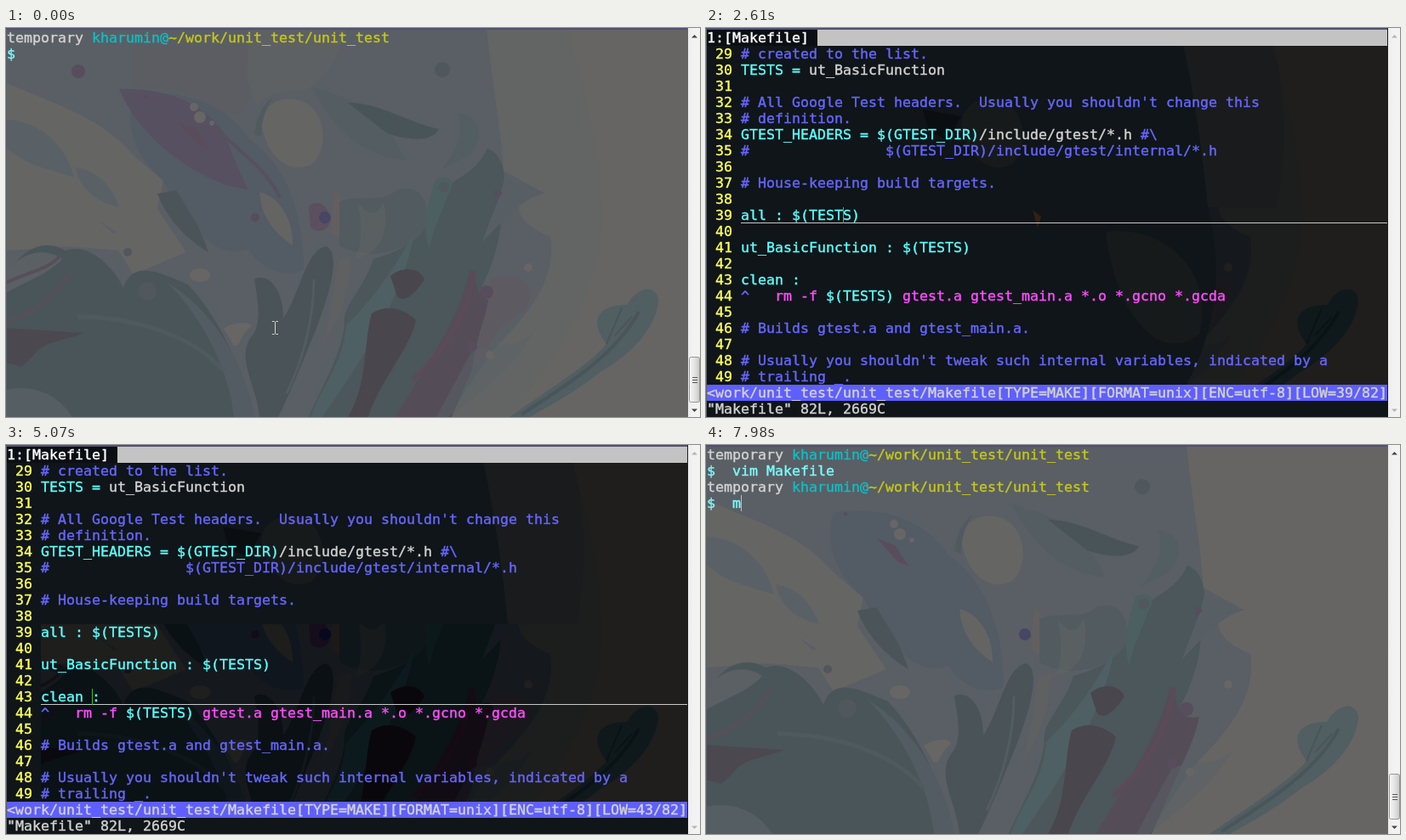
Recreate the animation shown at these times as an HTML page. Size 816 by 458 pixels, loop 8 s.

```html
<!DOCTYPE html>
<html lang="en">
<head>
<meta charset="utf-8">
<title>Terminal</title>
<style>
html, body { margin: 0; width: 100%; height: 100%; overflow: hidden; background: #666564; }
#stage { position: relative; width: 816px; height: 458px; overflow: hidden; }
#stage > * { position: absolute; }
svg { left: 0; top: 0; }
pre {
  left: 1px; top: 2px; margin: 0; white-space: pre;
  font: 16.61px/19px "DejaVu Sans Mono", monospace;
  -webkit-text-stroke: .4px currentColor;
  color: #d2d2d2;
}
.user { color: #12bcc6; }
.path { color: #c6c61c; }
.cmd { color: #7cfbff; }
.num { color: #ffff58; }
.note { color: #6666ff; }
.id { color: #5cffff; }
.shell { color: #ff4cff; }
.name { color: #fff; }
.vim .art { filter: contrast(1.92) brightness(.39); }
.vim #sh, .sh #vim, .sh .cover, .sh .bar, .late .early, .vim .thumb { display: none; }
.moved .low { display: none; }
#tab { left: 131px; top: 2px; width: 670px; height: 19px; background: #c3c3c3; }
#status { left: 1px; top: 420px; width: 800px; height: 19px; background: #5f5fff; }
#line { left: 41px; width: 760px; height: 1px; background: #c8c8c8; }
#caret { width: 1px; height: 19px; background: #b8c0b8; }
.vim #caret { background: #38c038; }
#edge { left: 0; top: 0; width: 801px; height: 456px; border: solid #505074; border-width: 2px 0 0; box-shadow: inset 1px 0 #5a6066; }
.arrow { fill: #444; }
.vim .arrow { fill: #b4b4b4; }
</style>
</head>
<body>
<div id="stage" class="sh">

<svg class="art" width="816" height="458">
  <rect width="816" height="458" fill="#666564"/>
  <path fill="#636464" d="M560 0H660C680 70 705 170 700 240C690 330 640 400 590 458H480Z" class="early"/>
  <path fill="#595f64" d="M0 0H565C572 70 582 120 585 168L632 194C594 196 590 225 640 246C648 300 610 340 572 380L520 458H0Z"/>
  <path fill="#656564" d="M0 64C50 88 110 102 150 150L185 180L178 213L212 264L150 290L132 262L75 257L0 262Z"/>
  <path fill="#656564" d="M284 0H400C390 40 372 62 350 74C325 72 300 78 296 94L284 62Z" class="early" opacity=".45"/>
  <g fill="#5a6166">
    <path d="M0 108C40 108 72 140 80 176C50 166 22 162 0 140Z"/>
    <path d="M82 164C110 168 126 190 133 211C108 206 86 190 82 164Z"/>
    <path d="M108 226L130 240L126 242Z"/>
  </g>
  <path fill="#535b64" d="M150 80C210 70 260 90 285 130C330 160 350 220 350 285C330 295 300 285 285 260C250 270 235 250 210 220L182 176C150 150 140 110 150 80Z"/>
  <path fill="#656564" d="M300 112C302 88 330 76 352 88C376 100 380 142 360 160C340 172 308 160 300 112Z"/>
  <path fill="#525a61" d="M292 125C296 100 304 88 314 82C304 96 300 112 300 128Z"/>
  <path class="early" fill="#575060" d="M133 72C180 70 230 84 258 126C265 150 276 170 284 190L262 186C215 170 158 130 133 72Z"/>
  <path class="early" fill="#605c62" opacity=".6" d="M150 20H285L282 70C288 100 270 110 250 96C210 70 180 70 150 70Z"/>
  <path fill="#594d5c" d="M201 110L222 118L238 142L226 138Z"/>
  <path class="early" fill="none" stroke="#57505f" stroke-width="4" d="M244 116C275 145 310 170 322 200"/>
  <path fill="#4b5459" d="M178 195L200 191C214 214 228 232 238 264C212 248 190 226 178 195Z"/>
  <path fill="#646463" d="M298 193C326 200 338 232 337 256C314 240 300 222 298 193Z"/>
  <path fill="#535d62" d="M360 70C400 82 440 90 470 156C430 152 390 130 360 70Z"/>
  <path fill="#495458" d="M402 88C440 88 474 112 509 119C502 134 474 133 448 124Z"/>
  <path fill="#525e62" d="M531 100C560 104 562 130 544 150C530 158 520 160 512 168C532 140 540 122 531 100Z"/>
  <path fill="#645f5f" d="M386 192C400 200 402 222 398 250L382 240Z"/>
  <path fill="#515b60" d="M392 204C420 196 446 206 460 190C486 184 500 200 494 240C470 262 430 276 392 256Z"/>
  <path fill="#636463" d="M414 206C418 230 420 254 410 272C440 266 452 240 444 204C438 220 428 224 414 206Z" opacity=".55"/>

  <path fill="#4a5559" d="M0 296C14 262 44 246 70 262C96 252 126 280 138 306C150 270 184 290 214 302C250 340 278 400 290 458H0Z"/>
  <path fill="#535c62" d="M190 300C240 330 280 390 292 458H268C262 400 230 340 190 300Z"/>
  <path fill="#5a6064" d="M0 290C16 262 48 258 66 272C50 290 20 300 0 312Z"/>
  <path fill="#4b494f" d="M0 353L92 359C72 368 44 368 32 386L18 399L0 394Z"/>
  <path fill="#555e63" d="M0 426C24 420 58 426 78 458H0Z"/>
  <g fill="none" stroke="#574f5a" stroke-width="4">
    <path d="M0 346C28 338 58 318 76 288"/>
    <path class="early" d="M0 300C30 286 50 284 64 268"/>
  </g>
  <path fill="none" stroke="#4f5a5f" stroke-width="5" d="M84 340C150 340 220 362 256 404"/>

  <path fill="#4b575a" d="M566 142C588 150 590 182 582 212C584 262 560 312 530 350L480 458H356C372 420 390 396 398 352C394 326 420 310 432 272C462 262 496 252 505 206C514 178 550 178 566 142Z"/>
  <path fill="#575f65" d="M586 176L634 194C604 202 586 226 560 252C570 222 582 200 586 176Z"/>
  <path fill="#4e6064" d="M400 350C420 330 448 300 480 240C470 310 420 390 372 458H358C372 420 396 396 400 350Z"/>
  <path fill="#4c5f61" d="M506 178C522 172 530 180 520 196C512 220 500 240 498 262C488 230 498 200 506 178Z"/>
  <path fill="#4a5357" d="M292 296C304 288 326 302 326 342C346 312 352 262 376 257C394 264 382 310 364 356C346 400 334 430 320 458H298C296 424 270 390 288 364C302 350 296 320 292 296Z"/>
  <path fill="none" stroke="#525d63" stroke-width="3" d="M330 430C350 390 362 340 362 296"/>
  <path fill="#636160" d="M390 274C384 310 382 340 372 372C390 350 406 310 406 268Z" opacity=".6"/>
  <path fill="#4a464d" d="M452 292C466 280 486 282 492 296C484 308 470 326 460 316ZM430 336C448 324 470 332 482 344C474 380 440 414 426 458H402C426 420 420 370 430 336Z"/>
  <path fill="#544d58" d="M546 284C556 300 552 326 580 320C574 350 560 374 550 398L524 458H458C492 400 530 350 546 284Z"/>
  <path fill="none" stroke="#5c4a58" stroke-width="5" d="M550 286C544 336 516 380 478 414"/>
  <path class="early" fill="#5e5a62" d="M570 296C600 282 630 302 610 332L582 352C566 372 562 396 548 402C552 360 568 340 570 296Z"/>
  <path fill="#5a6266" d="M548 380C580 370 610 380 624 350C600 400 556 430 520 458H506Z" opacity=".5"/>

  <path fill="#515e62" d="M592 458C640 424 684 398 706 372C686 346 694 326 730 326C744 302 766 302 767 322C764 352 736 384 700 404C668 430 636 446 616 458Z"/>
  <g fill="none" stroke="#4a555a" stroke-width="4">
    <path d="M606 455C660 420 716 386 744 334"/>
    <path d="M706 372L724 330M716 362L736 340" stroke-width="2"/>
  </g>
  <path class="early" fill="#5b4f60" d="M356 210C364 202 378 206 380 222C384 238 366 244 358 234Z"/>
  <circle cx="375" cy="223" r="7" fill="#474664"/>
  <g fill="#574d5c">
    <circle cx="85" cy="51" r="8" class="early"/>
    <circle cx="293" cy="223" r="5" class="early"/>
    <circle cx="164" cy="81" r="2"/>
    <circle cx="565" cy="311" r="8"/>
    <circle cx="548" cy="375" r="6"/>
    <path d="M573 190L584 194L578 202Z"/>
  </g>
  <g fill="#50575d">
    <circle cx="513" cy="49" r="9"/>
    <circle cx="143" cy="264" r="5"/>
    <circle cx="515" cy="187" r="6"/>
    <circle cx="166" cy="310" r="11"/>
  </g>
  <g fill="#676665">
    <circle cx="221" cy="93" r="5"/>
    <circle cx="228" cy="105" r="7"/>
    <circle cx="242" cy="112" r="3"/>
    <circle cx="569" cy="385" r="5"/>
    <circle cx="614" cy="282" r="5"/>
    <ellipse cx="228" cy="291" rx="12" ry="8"/>
    <path d="M256 354C270 344 290 346 288 352C274 362 276 376 268 374Z"/>
  </g>
</svg>

<svg class="cover" width="816" height="458">
  <path class="low" fill="#0f1518" d="M41 210H590C610 290 600 380 540 458H41Z"/>
  <path class="low" fill="#171a1b" d="M470 240C540 230 600 290 580 360C530 400 480 330 470 240Z"/>
  <path fill="#191b1c" d="M540 0H660C682 60 684 150 670 211H540Z"/>
  <path fill="#0f1518" d="M0 0H556C572 60 584 150 590 211H41V458H0Z"/>
  <path fill="#171a1b" d="M300 112C302 88 330 76 352 88C376 100 380 142 360 160C340 172 308 160 300 112Z"/>
  <path fill="#0a0e11" d="M255 96L300 104L284 132L262 122Z"/>
  <path class="low" fill="#35200f" d="M384 214L394 222L390 236Z"/>
  <rect y="439" width="802" height="19" fill="#0f1518"/>
  <rect y="2" width="131" height="19" fill="#0b0f13"/>
</svg>

<div id="edge"></div>
<div id="tab" class="bar"></div>
<div id="status" class="bar"></div>
<div id="line" class="bar"></div>
<pre id="sh"></pre>
<pre id="vim"></pre>
<div id="caret"></div>

<svg width="816" height="458">
  <defs>
    <linearGradient id="track"><stop stop-color="#ececec"/><stop offset=".4" stop-color="#f2f2f3"/><stop offset="1" stop-color="#f3f3f4"/></linearGradient>
    <linearGradient id="grip"><stop stop-color="#f6f6f6"/><stop offset=".5" stop-color="#e4e4e4"/><stop offset="1" stop-color="#c8c8c8"/></linearGradient>
  </defs>
  <rect x="802" width="14" height="458" fill="url(#track)"/>
  <path class="arrow" d="M806 11.5L809.5 8L813 11.5ZM806 448.5L809.5 452L813 448.5Z"/>
  <g class="thumb">
    <rect x="803.5" y="387.5" width="12" height="53" rx="2" fill="url(#grip)" stroke="#969696"/>
    <path d="M807 411.5H813M807 414.5H813M807 417.5H813" stroke="#555"/>
  </g>
  <path id="ibeam" fill="none" stroke="#d8d0d0" d="M313 345.5H315.5L316.5 346.5L317.5 345.5H320M316.5 346V360M313 360.5H315.5L316.5 359.5L317.5 360.5H320"/>
</svg>
</div>

<script>
const $ = id => document.getElementById(id);
const span = (cls, text) => `<span class="${cls}">${text}</span>`;
const note = text => span('note', text);
const id = text => span('id', text);
const shell = text => span('shell', text);

const ROW = 19, COL = 10, TOP = 2, LEFT = 1, FIRST = 29, LOOP = 8000;
const prompt = `temporary ${span('user', 'kharumin@')}${span('path', '~/work/unit_test/unit_test')}`;

const source = [
  note('# created to the list.'),
  id('TESTS =') + ' ut_BasicFunction',
  '',
  note("# All Google Test headers.  Usually you shouldn't change this"),
  note('# definition.'),
  id('GTEST_HEADERS = $(GTEST_DIR)') + '/include/gtest/*.h ' + note('#\\'),
  note('#' + ' '.repeat(16) + '$(GTEST_DIR)/include/gtest/internal/*.h'),
  '',
  note('# House-keeping build targets.'),
  '',
  id('all : $(TESTS)'),
  '',
  id('ut_BasicFunction : $(TESTS)'),
  '',
  id('clean :'),
  note('^   ') + shell('rm -f ') + id('$(TESTS)') + shell(' gtest.a gtest_main.a *.o *.gcno *.gcda'),
  '',
  note('# Builds gtest.a and gtest_main.a.'),
  '',
  note("# Usually you shouldn't tweak such internal variables, indicated by a"),
  note('# trailing _.')
].map((text, i) => span('num', ` ${FIRST + i} `) + text);

// Each step: time, editor line (0 = shell), typed text, caret row and column (none = hidden).
const make = 'vim Makefile', info = '"Makefile" 82L, 2669C';
const steps = [
  [0, 0, ''],
  [400, 0, 'vi', 1, 5],
  [700, 0, 'vim', 1, 6],
  [820, 0, 'vim ', 1, 7],
  [1380, 0, 'vim M', 1, 8],
  [1660, 0, 'vim Ma', 1, 9],
  [1780, 0, make, 1, 15],
  [2340, 0, make],
  [2490, 0, make, 2, 0],
  [2610, 39, info, 11, 16],
  [3170, 39, info],
  [3690, 39, info, 11, 16],
  [4090, 40, info, 12, 4],
  [4240, 41, info, 13, 16],
  [4770, 41, info],
  [4920, 42, info, 14, 4],
  [5070, 43, info, 15, 10],
  [5630, 43, info],
  [6190, 43, info, 15, 10],
  [6500, 43, ':', 23, 1],
  [6650, 43, ':q', 23, 2],
  [7180, 0, '', 3, 3],
  [7700, 0, ''],
  [7980, 0, 'm', 3, 4]
];

function show([time, line, typed, row, col]) {
  const late = time >= 7180;
  const entry = text => span('cmd', '$  ' + text);
  $('stage').className = (line ? 'vim' : 'sh') + (late ? ' late' : '') + (line > 39 ? ' moved' : '');
  $('ibeam').style.display = time ? 'none' : '';

  if (line) {
    const status = `&lt;work/unit_test/unit_test/Makefile[TYPE=MAKE][FORMAT=unix][ENC=utf-8][LOW=${line}/82]`;
    $('vim').innerHTML = [span('name', '1:[Makefile]'), ...source, status, typed].join('\n');
    $('line').style.top = TOP + ROW * (line - FIRST + 2) - 1 + 'px';
  } else {
    const lines = late ? [prompt, entry(make), prompt, entry(typed)] : [prompt, entry(typed)];
    $('sh').innerHTML = lines.join('\n');
  }

  const caret = $('caret').style;
  caret.display = row === undefined ? 'none' : '';
  caret.left = LEFT + COL * col + 'px';
  caret.top = TOP + ROW * row + 'px';
}

const start = performance.now();
let current;
function tick() {
  const t = (performance.now() - start) % LOOP;
  const step = steps.findLast(s => s[0] <= t);
  if (step !== current) show(current = step);
  requestAnimationFrame(tick);
}
tick();
</script>
</body>
</html>
```
